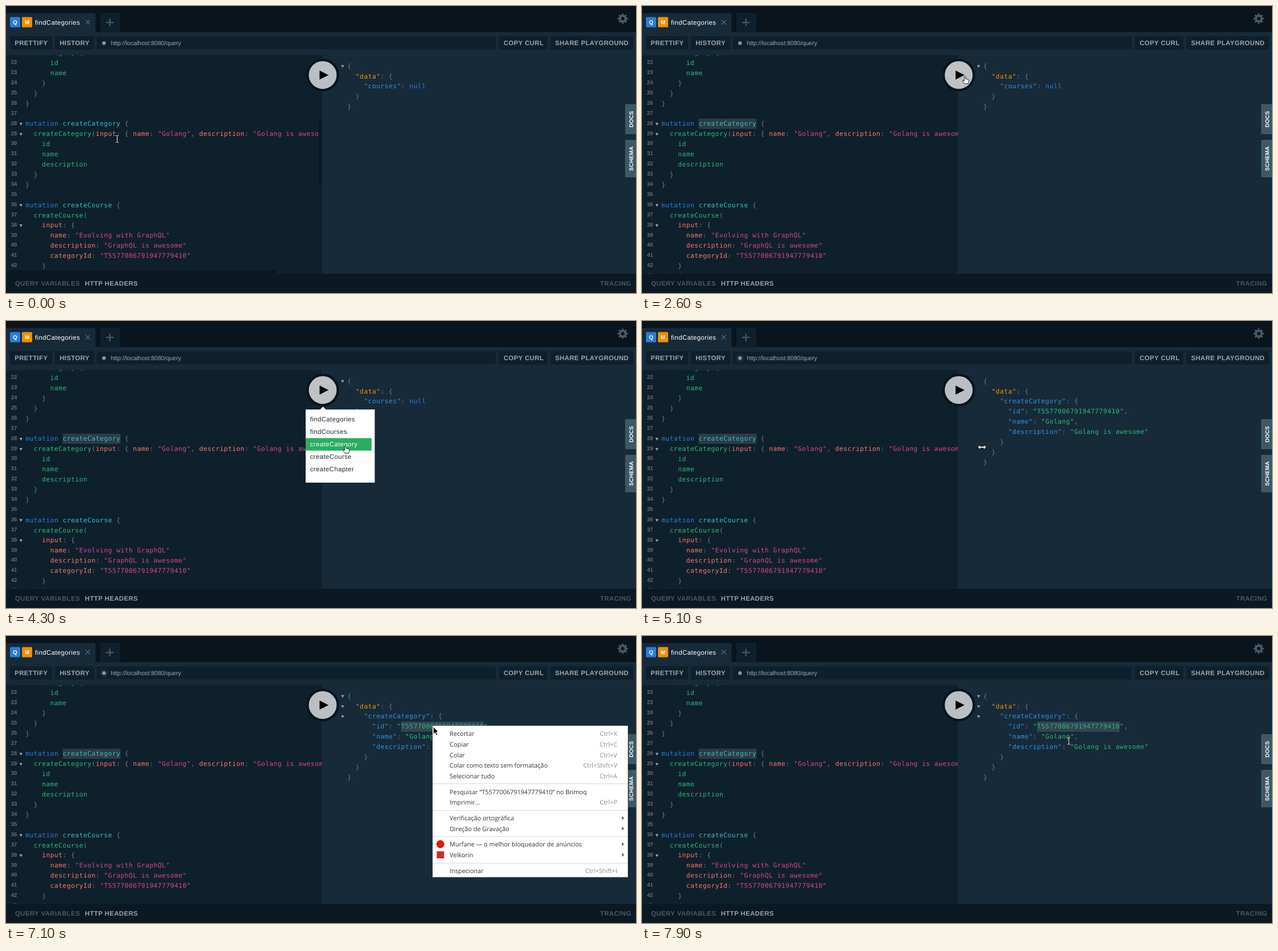
Animation, 1108 px wide and 506 px high, one loop 8000 ms. Source, as an HTML page:

```html
<!DOCTYPE html>
<html lang="en">
<head>
<meta charset="utf-8">
<title>Query editor</title>
<style>
html, body { margin: 0; width: 100%; height: 100%; overflow: hidden; background: #172a3a; }
svg { display: block; width: 1108px; height: 506px; }
text { white-space: pre; text-rendering: geometricPrecision; }
.ui { font: 11.36px "Liberation Sans", Arial, sans-serif; letter-spacing: .43px; }
.b { font-weight: 700; }
.small { font: 700 9.73px "Liberation Sans", Arial, sans-serif; }
.code { font: 11.36px "DejaVu Sans Mono", monospace; letter-spacing: .43px; }
.menu { font: 10.9px "Open Sans", "Noto Sans", sans-serif; }
</style>
</head>
<body>
<svg id="stage" viewBox="0 0 1108 506" xmlns="http://www.w3.org/2000/svg"></svg>
<script>
const LOOP = 8000, LINE = 17.9, CHAR = 7.27;
const LEFT = 34.2, RIGHT = 600.3;

const color = {
  punct: '#6f7982', keyword: '#2a7ed3', def: '#38bdc1', prop: '#29b973',
  attr: '#f77466', string: '#d64292', key: '#338fd9', data: '#f18f01'
};

// Drawing helpers
const rect = (x, y, w, h, fill, more = '') =>
  `<rect x="${x}" y="${y}" width="${w}" height="${h}" fill="${fill}" ${more}/>`;
const path = (d, fill, more = '') => `<path d="${d}" fill="${fill}" ${more}/>`;
const circle = (x, y, r, fill, more = '') =>
  `<circle cx="${x}" cy="${y}" r="${r}" fill="${fill}" ${more}/>`;
const label = (x, y, s, fill, cls = 'ui b', more = '') =>
  `<text x="${x}" y="${y}" fill="${fill}" class="${cls}" ${more}>${s}</text>`;
const group = (id, body, more = '') => `<g id="${id}" ${more}>${body}</g>`;
const fold = (x, y) => path(`M${x - 2.7} ${y - 2}h5.4l-2.7 4.6z`, '#9aa4ab');

// Syntax colouring
function queryColor(word, before, after) {
  if (word[0] === '"') return color.string;
  if (!/\w/.test(word)) return color.punct;
  if (word === 'mutation') return color.keyword;
  if (/mutation $/.test(before)) return color.def;
  return after[0] === ':' ? color.attr : color.prop;
}
function jsonColor(word, before, after) {
  if (word === 'null') return color.keyword;
  if (word[0] !== '"') return color.punct;
  if (after[0] !== ':') return color.prop;
  return word === '"data"' ? color.data : color.key;
}
function codeLine(x, y, s, pick) {
  const spans = s.replace(/"[^"]*"?|\w+|[^\w\s"]/g, (word, at) =>
    `<tspan fill="${pick(word, s.slice(0, at), s.slice(at + word.length))}">${word}</tspan>`);
  return `<text x="${x}" y="${y}" class="code">${spans}</text>`;
}

const query = `    category {
      id
      name
    }
  }
}

mutation createCategory {
  createCategory(input: { name: "Golang", description: "Golang is awesome" }) {
    id
    name
    description
  }
}

mutation createCourse {
  createCourse(
    input: {
      name: "Evolving with GraphQL"
      description: "GraphQL is awesome"
      categoryId: "T5577006791947779410"
    }
  ) {`.split('\n');

const before = `{
  "data": {
    "courses": null
  }
}`.split('\n');

const after = `{
  "data": {
    "createCategory": {
      "id": "T5577006791947779410",
      "name": "Golang",
      "description": "Golang is awesome"
    }
  }
}`.split('\n');

const lineY = n => 104 + (n - 22) * LINE;
const json = lines => lines.map((s, i) => codeLine(RIGHT, 109.6 + i * LINE, s, jsonColor)).join('');
const jsonFolds = n => Array.from({ length: n }, (_, i) => fold(592, 106.3 + i * LINE)).join('');

function editor() {
  const rows = query.map((s, i) => {
    const n = 21 + i, y = lineY(n);
    return (n > 21 ? label(8.7, y - 1.8, n, '#5f6c75', 'small') : '') + codeLine(LEFT, y, s, queryColor);
  }).join('');
  const folds = [28, 29, 36, 38, 43].map(n => fold(26.3, lineY(n) - 3.3)).join('');
  return rect(0, 86.5, 555.5, 386, '#0f202d') +
    `<g clip-path="url(#pane)">` +
    group('selName', rect(LEFT + 9 * CHAR, 198.7, 14 * CHAR, LINE, '#fff', 'opacity=".12"')) +
    rows + folds +
    group('caret', rect(201.3, 200, 1, 15.5, '#fff', 'opacity=".45"')) + '</g>' +
    group('bars', rect(550, 86.5, 5.5, 386, '#0f202d') + rect(0, 466, 555.5, 6, '#0f202d') +
      rect(550, 203, 5, 112, '#0b1720') + rect(0, 466, 475, 6, '#0b1720'));
}

function header() {
  const button = (x, w, s) => rect(x, 53, w, 24, '#0f202d', 'rx="1.6"') + label(x + 8.2, 69.2, s, '#9fa6ab');
  const badge = (x, s, fill) => rect(x, 19.5, 18, 18, fill, 'rx="1.6"') +
    label(x + 9, 32, s, '#fff', 'small', 'text-anchor="middle"');
  return rect(0, 0, 1108, 46, '#09141c') +
    path('M0 12.500H155.500q2 0 2 2V46H0z', '#172a3a') +
    badge(7, 'Q', '#2a7ed3') + badge(28, 'M', '#f18f01') +
    label(51, 32.6, 'findCategories', '#fff', 'ui') +
    path('M139.800 24.700l8 8m0-8l-8 8', 'none', 'stroke="#5f6d78" stroke-width="1.2"') +
    rect(166, 12, 35, 33.5, '#0f202d', 'rx="1.6"') +
    path('M176 29h13.400m-6.700-6.700v13.400', 'none', 'stroke="#43525d" stroke-width="2.6"') +
    circle(1084.700, 22.300, 5, 'none', 'stroke="#485965" stroke-width="4"') +
    circle(1084.700, 22.300, 7.500, 'none',
      'stroke="#485965" stroke-width="3.200" pathLength="16" stroke-dasharray="1 1" stroke-dashoffset=".5"') +
    button(7, 74, 'PRETTIFY') + button(86, 69, 'HISTORY') +
    button(867, 85, 'COPY CURL') + button(957.5, 145.5, 'SHARE PLAYGROUND') +
    rect(159.5, 53.5, 702, 23, '#0f202d', 'rx="1.6" stroke="#162733"') +
    circle(172.3, 65.4, 3, '#8b959c', 'id="halo"') + circle(172.3, 65.4, 3.2, '#8b959c') +
    `<text x="184.3" y="69.2" fill="#9fa6ab" style="font:10.55px 'Liberation Sans',Arial,sans-serif">http://localhost:8080/query</text>`;
}

function sideTab(y, h, s) {
  const mid = y + h / 2;
  return path(`M1108 ${y}h-17.500q-1.600 0-1.600 1.600v${h - 3.2}q0 1.600 1.600 1.600h17.500z`, '#3d5866') +
    label(1103, mid, s, '#fff', 'small', `text-anchor="middle" letter-spacing=".2" transform="rotate(-90 1103 ${mid})"`);
}

const operations = ['findCategories', 'findCourses', 'createCategory', 'createCourse', 'createChapter'];
const dropdown = path('M552 156.500l5.500-5.500 5.500 5.500z', '#fff') + rect(527, 156, 121.5, 129, '#fff') +
  rect(527, 162.5, 116, 22, '#27ae60', 'id="row"') +
  operations.map((s, i) => label(534.7, 176.8 + i * 22, s, '#1d2731', 'ui', 'data-op')).join('');

function contextMenu() {
  const item = (y, s, keys) => label(780.3, y + 4, s, '#333', 'menu') +
    (keys ? label(1075, y + 4, keys, '#8a8a8a', 'menu', 'text-anchor="end"') : '');
  const more = y => path(`M1083.300 ${y - 3.500}l4 3.500-4 3.500z`, '#666');
  return rect(752, 161, 343, 266, '#000', 'opacity=".2"') +
    rect(750.5, 158.500, 343, 266.500, '#fff', 'stroke="#c4c4c4"') +
    [260.5, 307.5, 353.5, 400.5].map(y => rect(751, y - .5, 342, 1, '#d8d8d8')).join('') +
    item(172, 'Recortar', 'Ctrl+X') + item(190.7, 'Copiar', 'Ctrl+C') + item(209.5, 'Colar', 'Ctrl+V') +
    item(228.2, 'Colar como texto sem formatação', 'Ctrl+Shift+V') +
    item(247, 'Selecionar tudo', 'Ctrl+A') +
    item(274.5, 'Pesquisar “T5577006791947779410” no Brimoq') + item(293.2, 'Imprimir…', 'Ctrl+P') +
    item(321, 'Verificação ortográfica') + more(321) + item(339.7, 'Direção de Gravação') + more(339.5) +
    item(367.2, 'Murfane — o melhor bloqueador de anúncios') + more(367) +
    item(386, 'Velkorin') + more(385.7) + item(413.6, 'Inspecionar', 'Ctrl+Shift+I') +
    circle(764, 367, 7, '#e0190f') + rect(757.500, 379.500, 13, 12.500, '#d32d27') +
    group('hover', rect(751, 181, 342, 18.5, '#8fb171') + label(780.3, 194.7, 'Copiar', '#fff', 'menu') +
      label(1075, 194.7, 'Ctrl+C', '#fff', 'menu', 'text-anchor="end"'));
}

const beam = 'M-2.500-6.200q2.500 0 2.500 1.200q0-1.200 2.500-1.200M0-5V5M-2.500 6.200q2.500 0 2.500-1.200q0 1.200 2.500 1.200';
const outline = 'stroke="#000" stroke-width=".9" stroke-linejoin="round"';
const pointers = {
  beam: path(beam, 'none', 'stroke="#000" stroke-width="2.2" opacity=".6"') + path(beam, 'none', 'stroke="#fff"'),
  hand: path('M-1.300 .8q1.200-1.600 2.400 0v4q1.300-.8 2 .3q1.300-.6 2 .5q1.600-.3 1.800 1.200v2.700l-1.300 3.500H-.8' +
    'l-3.500-4.500q-.3-1.600 1.300-1.400l1.700 1.300z', '#fff', outline),
  resize: path('M-7.500 0l4.500-4.300v2.800h6v-2.800l4.500 4.300-4.500 4.300v-2.800h-6v2.800z', '#fff', outline),
  arrow: path('M0 0v13l3-2.800 2.200 5 2.200-1-2.200-4.800h4z', '#000', 'stroke="#fff" stroke-width=".9"')
};

const stage = document.getElementById('stage');
stage.innerHTML =
  '<clipPath id="pane"><rect y="86.5" width="555.5" height="385.5"/></clipPath>' +
  rect(0, 0, 1108, 506, '#172a3a') + header() + editor() +
  group('selId', rect(RIGHT + 13 * CHAR, 151, 20 * CHAR, LINE, '#fff', 'opacity=".12"')) +
  group('before', json(before) + jsonFolds(1)) + group('after', json(after)) + group('afterFolds', jsonFolds(3)) +
  rect(0, 472, 1108, 34, '#0b1924') +
  label(16, 493, 'QUERY VARIABLES', '#4c5860') + label(138.8, 493, 'HTTP HEADERS', '#9aa2a8') +
  label(1044.8, 493, 'TRACING', '#4c5860') +
  sideTab(173, 53, 'DOCS') + sideTab(236, 66, 'SCHEMA') +
  circle(557, 121.700, 29, '#09141c') + circle(557, 121.700, 24.500, '#b9bfc4', 'id="play"') +
  path('M551.500 113.700l15.700 8-15.700 8z', '#000') +
  group('dropdown', dropdown) + group('menu', contextMenu()) +
  group('mouse', Object.entries(pointers).map(([k, s]) => group(k, s)).join(''));

const el = id => document.getElementById(id);
const show = (id, on) => { el(id).style.display = on ? '' : 'none'; };
const ops = [...document.querySelectorAll('[data-op]')];

// Each move: first step, last step, x and y reached
const moves = [
  [0, 0, 195.5, 234.5], [100, 100, 131, 234.5], [400, 600, 52, 216], [700, 1100, 154, 212],
  [1300, 1400, 201.3, 199.5], [1500, 1800, 326, 172], [2100, 2200, 325, 170], [2500, 2600, 568, 124],
  [3000, 3300, 560, 172], [3400, 3800, 589, 227], [3900, 4000, 599, 222], [4300, 4300, 597, 220],
  [4600, 4800, 598, 222.5], [5500, 5600, 832, 160], [5700, 5700, 744, 167], [6000, 6100, 751.5, 160],
  [7300, 7600, 793.5, 185.5], [7800, 7800, 788, 185], [7900, 7900, 750.7, 185]
];
function mouseAt(t) {
  let x = 0, y = 0;
  for (const [start, end, tx, ty] of moves) {
    if (t < start) break;
    const f = Math.min(1, (t - start + 100) / (end - start + 100));
    x += (tx - x) * f;
    y += (ty - y) * f;
  }
  return [x, y];
}

function render(time) {
  const t = Math.floor(time % LOOP / 100) * 100;
  const within = (a, b) => t >= a && t < b;
  const [x, y] = mouseAt(t);

  const kind = within(2600, 4600) ? 'hand' : within(4600, 5500) ? 'resize' :
    within(7000, 7800) ? 'arrow' : 'beam';
  for (const k in pointers) show(k, k === kind);
  el('mouse').setAttribute('transform', `translate(${x} ${y})`);

  show('selName', t >= 1000);
  show('caret', within(1000, 2600) && Math.floor((t - 1000) / 530) % 2 === 0);
  show('bars', t < 2600);
  el('play').setAttribute('fill', kind === 'hand' ? '#bec2c5' : '#b9bfc4');

  show('dropdown', within(3000, 4600));
  const row = Math.floor((y - 162) / 22);
  show('row', row >= 0);
  el('row').setAttribute('y', 162.5 + row * 22);
  ops.forEach((op, i) => op.setAttribute('fill', i === row ? '#fff' : '#1d2731'));

  show('before', t < 4900);
  show('after', t >= 4900);
  show('afterFolds', t >= 5500);
  show('selId', t >= 6600);
  show('menu', within(7000, 7800));
  show('hover', y >= 181);

  // Polling pulse: spreads and fades, then rests
  const p = Math.min(1, (t + 1400) % 2000 / 1100);
  const ease = 1 - (1 - p) ** 2;
  el('halo').setAttribute('r', 3 + 6.5 * ease);
  el('halo').setAttribute('opacity', .3 * (1 - ease));
}

const begin = performance.now();
function tick() {
  render(performance.now() - begin);
  requestAnimationFrame(tick);
}
tick();
</script>
</body>
</html>
```
